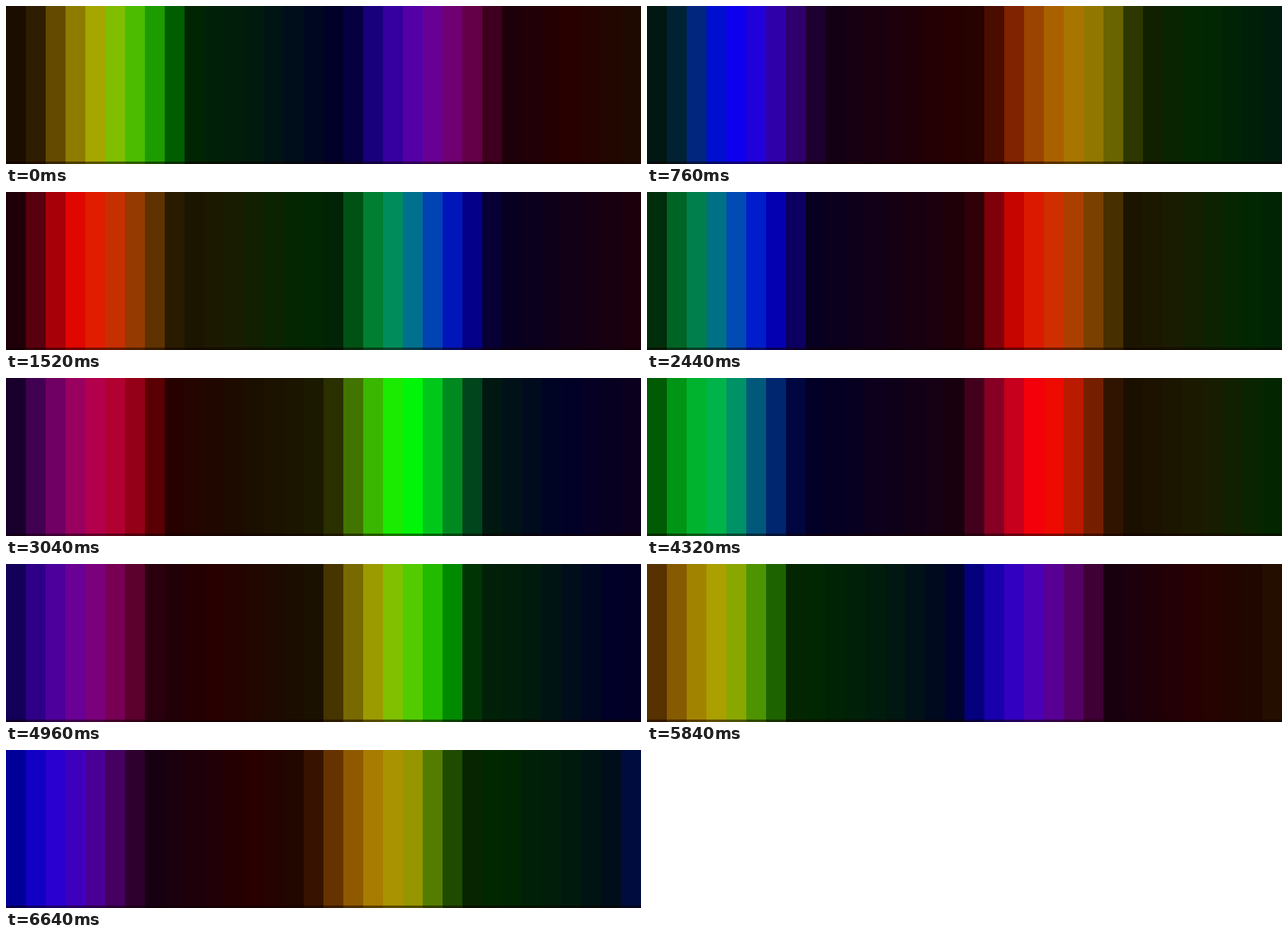
These frames come from a looping animation (1024 by 256 pixels, 6680 ms). An HTML page:

```html
<!DOCTYPE html>
<html lang="en">
<head>
<meta charset="utf-8">
<title>Rainbow strip</title>
<style>
  html, body { margin: 0; width: 100%; height: 100%; overflow: hidden; background: #000; }
  svg { display: block; width: 100vw; height: 100vh; }
</style>
</head>
<body>
<svg id="strip" viewBox="0 0 1024 256" preserveAspectRatio="none" shape-rendering="crispEdges"></svg>
<script>
const LOOP = 6680, STEP = 40, COUNT = 32, SIZE = 32;
const FLOOR = 0.157;

// Sixteen evenly spaced hues around the wheel
const WHEEL = ['FF0000', 'D52A00', 'AB5500', 'AB7F00', 'ABAB00', '56D500', '00FF00', '00D52A',
  '00AB55', '0056AA', '0000FF', '2A00D5', '5500AB', '7F0081', 'AB0055', 'D5002B']
  .map(hex => [0, 2, 4].map(i => parseInt(hex.slice(i, i + 2), 16)));

// [time in ms, hue of the first bar, centre of the first bright wave]
const KEYS = [
  [0, 32, 4.65], [1520, 235, 4.25], [2440, 370, 3.82], [3640, 533, 3.5],
  [4960, 688, 3.2], [5840, 804, 2.9], [6640, 928, 2.6]
];

// Moments where the picture stands still
const HOLDS = [[2440, 2560], [3640, 3720]];

const svg = document.getElementById('strip');

function addRect(x, y, w, h, fill) {
  const r = document.createElementNS('http://www.w3.org/2000/svg', 'rect');
  const attrs = { x, y, width: w, height: h, fill };
  for (const name in attrs) r.setAttribute(name, attrs[name]);
  svg.appendChild(r);
  return r;
}

const bars = Array.from({ length: COUNT }, (_, i) => addRect(i * SIZE, 0, SIZE, 256, '#000'));
addRect(0, 252, 1024, 4, 'rgba(16,0,0,0.5)');

function stateAt(t) {
  let k = 0;
  while (k < KEYS.length - 2 && t >= KEYS[k + 1][0]) k++;
  const [a, b] = [KEYS[k], KEYS[k + 1]];
  const p = (t - a[0]) / (b[0] - a[0]);
  return [a[1] + (b[1] - a[1]) * p, a[2] + (b[2] - a[2]) * p];
}

function colour(hue, level) {
  const h = hue % 256;
  const i = Math.floor(h / 16), p = h / 16 - i;
  const a = WHEEL[i], b = WHEEL[(i + 1) % 16];
  return `rgb(${a.map((v, c) => Math.round((v + (b[c] - v) * p) * level))})`;
}

function draw(ms) {
  let t = Math.floor((ms % LOOP) / STEP) * STEP;
  for (const [from, to] of HOLDS) if (t > from && t < to) t = from;
  const [hue, centre] = stateAt(t);
  bars.forEach((bar, i) => {
    const wave = Math.max(0, Math.cos((i - centre) * Math.PI / 8));
    bar.setAttribute('fill', colour(Math.floor(hue) + i * 8, FLOOR + (1 - FLOOR) * wave));
  });
}

function tick() {
  draw(performance.now());
  requestAnimationFrame(tick);
}
draw(0);
requestAnimationFrame(tick);
</script>
</body>
</html>
```
